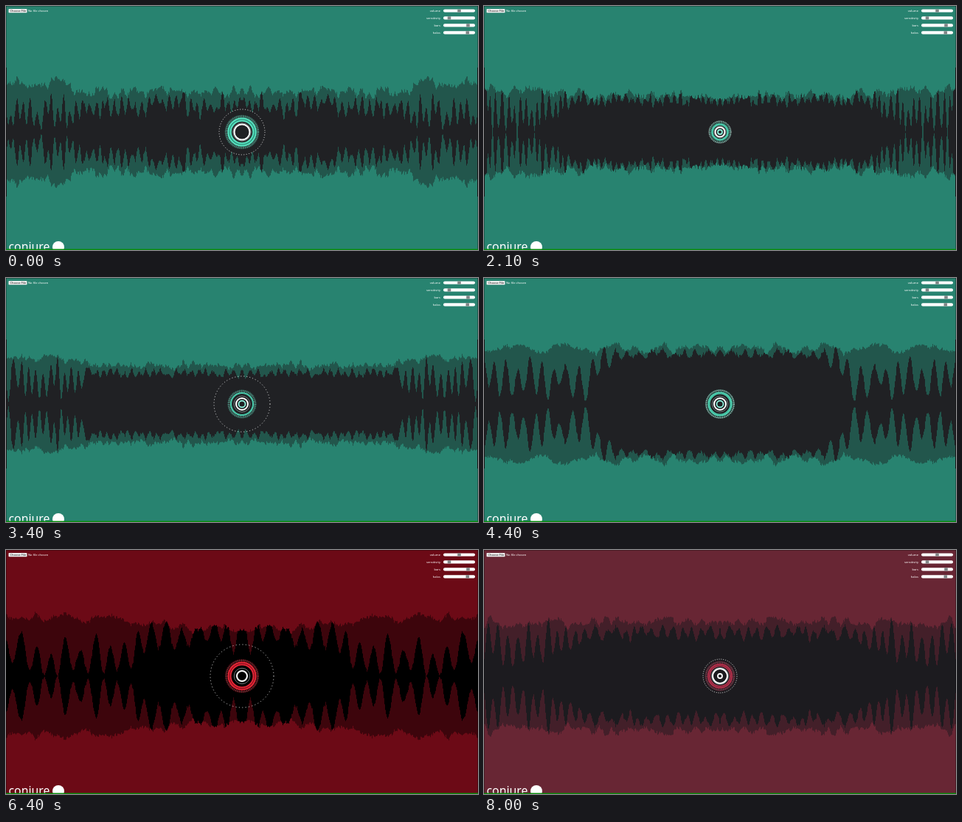
These frames come from a looping animation (640 by 333 pixels, 8100 ms). An HTML page with a canvas:

```html
<!DOCTYPE html>
<html lang="en">
<head>
<meta charset="utf-8">
<title>Audio visualizer</title>
<style>
  html, body { margin: 0; width: 100%; height: 100%; overflow: hidden; }
  canvas, svg { position: absolute; left: 0; top: 0; width: 100%; height: 100%; display: block; }
  text { font-family: "Noto Sans", "Open Sans", sans-serif; fill: #fff; }
  .small { font-size: 4.1px; }
</style>
</head>
<body>
<canvas id="stage" width="640" height="333"></canvas>
<svg id="ui" viewBox="0 0 640 333" preserveAspectRatio="none">
  <rect x="3.5" y="4" width="25" height="5.2" rx="0.8" fill="#f0f0f0"/>
  <text class="small" x="5.4" y="8.1" style="fill:#111">Choose File</text>
  <text class="small" x="30" y="8.1">No file chosen</text>
  <text x="3.5" y="333.6" font-size="15.8">conjure</text>
  <circle cx="71" cy="329" r="8" fill="#fff"/>
  <rect y="331.6" width="640" height="1.4" fill="#088c0c"/>
</svg>
<script>
const W = 640, H = 333, CX = 320, CY = 172, LOOP = 8100, STEP = 100;
const ctx = document.getElementById('stage').getContext('2d');

// The wave eases from an outer level to a core level between x = from and x = to.
// lobe is the width of one peak, dip how deeply the core is cut between peaks.
const scenes = [
  { at: 0, from: 75, to: 105, bars: [24, 37], shade: [66, 54], lobe: 9, dip: 0.42,
    dots: 31, accent: 17, band: 5.5, white: 10.5, core: 0 },
  { at: 2100, from: 70, to: 125, bars: [32, 44], shade: [57, 50], lobe: 8, dip: 0.24,
    dots: 15, accent: 10.5, band: 2.5, white: 6.5, core: 3 },
  { at: 3400, from: 85, to: 120, bars: [30, 42], shade: [62, 53], lobe: 10, dip: 0.16,
    dots: 38, accent: 15, band: 2, white: 8, core: 4.5 },
  { at: 4400, from: 120, to: 195, bars: [32, 70], shade: [75, 76], lobe: 16, dip: 0.1,
    dots: 19, accent: 15, band: 3, white: 8, core: 4.5 },
  { at: 5300, from: 120, to: 220, bars: [24, 75], shade: [75, 79], lobe: 17, dip: 0.12,
    dots: 36, accent: 16, band: 3, white: 8, core: 4.5 },
  { at: 6400, from: 120, to: 250, bars: [29, 54], shade: [79, 66], lobe: 20, dip: 0.5,
    dots: 43, accent: 17, band: 5, white: 7, core: 0 },
  { at: 8000, from: 60, to: 150, bars: [38, 59], shade: [73, 74], lobe: 13, dip: 0.2,
    dots: 23, accent: 15, band: 4, white: 10, core: 3 }
];

const teal = { back: '#288370', shade: '#22564c', bars: '#202124', accent: '#55dfbd', edge: 88 };
const red = { back: '#6c0a16', shade: '#3d050c', bars: '#000000', accent: '#e32636', edge: 0 };
const wine = { back: '#682634', shade: '#431f29', bars: '#1c1b1f', accent: '#b52f4b', edge: 0 };
const paletteAt = t => t < 5100 ? teal : t < 7200 ? red : wine;

const clamp = (v, lo, hi) => Math.min(hi, Math.max(lo, v));
const smooth = k => k * k * (3 - 2 * k);
const mix = (a, b, k) => Array.isArray(a) ? a.map((v, i) => mix(v, b[i], k)) : a + (b - a) * k;

function sceneAt(t) {
  const last = scenes.findIndex(s => s.at >= t);
  const i = last < 0 ? scenes.length - 1 : Math.max(1, last);
  const a = scenes[i - 1], b = scenes[i], k = smooth((t - a.at) / (b.at - a.at));
  return Object.fromEntries(Object.keys(a).map(key => [key, mix(a[key], b[key], k)]));
}

function hash(x, y) {
  const s = Math.sin(x * 127.1 + y * 311.7) * 43758.5453;
  return s - Math.floor(s);
}

// Smooth value noise in place and time, from -1 to 1.
function noise(x, y) {
  const i = Math.floor(x), j = Math.floor(y);
  const u = smooth(x - i), v = smooth(y - j);
  const row = n => mix(hash(i, n), hash(i + 1, n), u);
  return 2 * mix(row(j), row(j + 1), v) - 1;
}

function heightsAt(x, s, beat) {
  const d = CX - x;
  const k = smooth(clamp((x - s.from) / (s.to - s.from), 0, 1));
  // Regular peaks, bent and scaled by noise so that no two are alike.
  const bend = noise(d / (s.lobe * 2), beat) * 2;
  const peak = Math.cos(d / s.lobe * Math.PI * 2 + bend) * 0.55 + noise(d / s.lobe * 1.6, beat + 40) * 0.6;
  const spike = noise(x / 1.4, beat + 80);
  const base = mix(...s.bars, k);
  const bars = base * (1 + peak * mix(1.05, s.dip, k)) + spike * Math.min(4, base / 8);
  const shade = mix(...s.shade, k) * (1 + noise(d / s.lobe * 1.5, beat + 20) * 0.12)
    + peak * 2 + noise(x / 1.3, beat + 60) * 4;
  return { shade, bars: clamp(bars, 0, shade) };
}

function fillWave(heights, color) {
  ctx.fillStyle = color;
  heights.forEach((h, x) => {
    ctx.fillRect(x, CY - h, 1, h * 2);
    ctx.fillRect(W - 1 - x, CY - h, 1, h * 2);
  });
}

function ring(r, width, color, dash = []) {
  if (r < 0.3) return;
  ctx.strokeStyle = color;
  ctx.lineWidth = width;
  ctx.setLineDash(dash);
  ctx.beginPath();
  ctx.arc(CX, CY, r, 0, Math.PI * 2);
  ctx.stroke();
}

function drawHalos(s, p) {
  const rim = s.accent + s.band / 2;
  ctx.fillStyle = p.bars;
  ctx.beginPath();
  ctx.arc(CX, CY, rim, 0, Math.PI * 2);
  ctx.fill();
  ctx.globalAlpha = 0.6;
  ring(rim + 1.5, 4, p.accent, [0.7, 0.8]);
  ctx.globalAlpha = 1;
  ring(s.accent, s.band, p.accent);
  ring(s.accent, s.band / 5, p.back);
  ring((s.accent - s.band / 2 + s.white) / 2, 1, '#70797a');
  ring(s.white, 2, '#fff');
  ring(s.core, 1.8, p === teal ? '#8cefda' : '#fff');
  ring(rim + 2, 0.7, 'rgba(255,255,255,.5)', [1, 1.2]);
  ring(s.dots, 1, 'rgba(255,255,255,.8)', [1.1, Math.max(1, s.dots / 13)]);
}

function draw(t) {
  const p = paletteAt(t), s = sceneAt(t);
  const wave = Array.from({ length: CX }, (_, x) => heightsAt(x, s, t / 150));
  const bars = wave.map(h => h.bars);
  bars[0] = Math.max(bars[0], p.edge);
  ctx.fillStyle = p.back;
  ctx.fillRect(0, 0, W, H);
  fillWave(wave.map(h => h.shade), p.shade);
  fillWave(bars, p.bars);
  ctx.fillStyle = 'rgba(0,0,0,.3)';
  ctx.fillRect(0, 0, W, 1);
  ctx.fillRect(0, 0, 1, H);
  ctx.fillRect(W - 1, 0, 1, H);
  drawHalos(s, p);
}

function addSlider(label, y, thumb) {
  const ui = document.getElementById('ui');
  const add = (tag, attrs) => {
    const el = document.createElementNS(ui.namespaceURI, tag);
    for (const key in attrs) el.setAttribute(key, attrs[key]);
    return ui.appendChild(el);
  };
  const bar = { y: y - 2.1, height: 4.2 };
  add('text', { class: 'small', x: 589, y: y + 1.6, 'text-anchor': 'end' }).textContent = label;
  add('rect', { ...bar, x: 593, width: 43, rx: 2, fill: '#fff' });
  add('rect', { ...bar, x: thumb - 2.3, width: 4.6, rx: 0.5, fill: '#808586' });
}

addSlider('volume', 6.5, 614.5);
addSlider('sensitivity', 16.4, 601);
addSlider('bars', 26.4, 626.5);
addSlider('halos', 36.4, 625.8);

const start = performance.now();
function tick() {
  const t = (performance.now() - start) % LOOP;
  draw(Math.min(LOOP - STEP, Math.floor(t / STEP) * STEP));
  requestAnimationFrame(tick);
}
tick();
</script>
</body>
</html>
```
